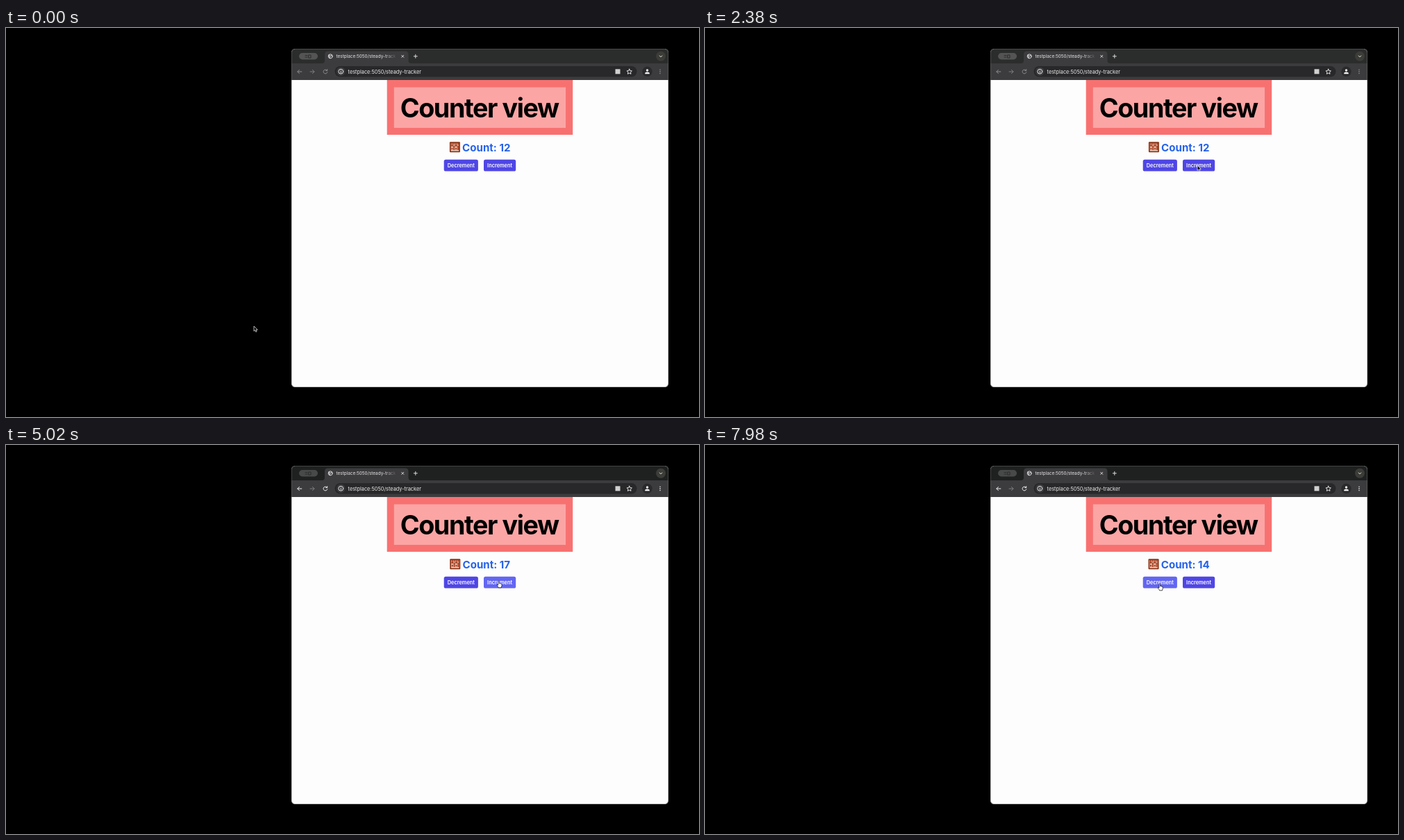
Recreate the animation shown at these times as an HTML page. Size 998 by 561 pixels, loop 8 s.

```html
<!DOCTYPE html>
<html lang="en">
<head>
<meta charset="utf-8">
<title>Counter view</title>
<style>
  html, body { margin: 0; width: 100%; height: 100%; overflow: hidden; background: #000; }
  svg { display: block; width: 998px; height: 561px; }
  text { font-family: Inter, "Open Sans", sans-serif; font-optical-sizing: none; }
  .line { fill: none; stroke-width: 1; stroke-linecap: round; stroke-linejoin: round; }
  .bold { font-weight: 700; }
  .mid { text-anchor: middle; }
  .strip { fill: #2b2c2c; }
  .pill { fill: #535453; }
  .control { stroke: #8c8c8e; }
  .dots { fill: #8c8c8e; }
  .active .strip { fill: #1f2121; }
  .active .pill { fill: #484949; }
  .active .control { stroke: #eee; }
  .active .dots { fill: #eee; }
  .button { fill: #4f46e5; }
  .button.hover { fill: #6366f1; }
</style>
</head>
<body>
<svg viewBox="0 0 998 561">
  <defs>
    <clipPath id="frame"><rect x="411" y="30" width="543" height="488" rx="5.5"/></clipPath>
    <linearGradient id="fade" gradientUnits="userSpaceOnUse" x1="545" x2="563" y1="0" y2="0">
      <stop stop-color="#e4e4e4"/>
      <stop offset="1" stop-color="#e4e4e4" stop-opacity="0"/>
    </linearGradient>
  </defs>

  <g id="browser" clip-path="url(#frame)">
    <rect x="411" y="30" width="543" height="488" fill="#fdfdfd"/>
    <rect class="strip" x="411" y="30" width="543" height="22"/>
    <path d="M455 51q4 0 4-4V38q0-4.500 4.500-4.500H575q4.500 0 4.500 4.500v9q0 4 4 4H954V75H411V51z" fill="#3c3c3e"/>
    <rect class="pill" x="422" y="36" width="27" height="9.500" rx="4.700"/>
    <path d="M431 39.500h3M431 42h3M436 39h3v4h-3z" class="line" stroke="#2c2d2d"/>

    <g class="line" stroke="#dcdcdc">
      <circle cx="467.200" cy="40.800" r="3"/>
      <path d="M465 39l2 1.500 2-1M466.500 43.500v-2l-2-1"/>
      <path d="M569.800 39.300l3 3m0-3l-3 3M587.300 40.800h5m-2.500-2.500v5"/>
    </g>
    <text x="475.500" y="43" font-size="6.400" fill="url(#fade)">testplace:5050/steady-track</text>
    <circle cx="943" cy="40.700" r="7" fill="#3c3d38"/>
    <path class="line" stroke="#eee" d="M941.200 40l1.800 1.800 1.800-1.800"/>

    <g class="line control">
      <path d="M425.800 63h-6m2.600-2.600L419.800 63l2.600 2.600"/>
      <path d="M462.300 61.200a2.900 2.900 0 1 0 .5 2.500M462.700 59.700v1.900h-1.900"/>
    </g>
    <path class="line" stroke="#7e7e80" d="M438 63h6m-2.600-2.600L444 63l-2.600 2.600"/>
    <rect x="473.500" y="55" width="435" height="15.500" rx="7.700" fill="#28282a"/>
    <circle cx="482.300" cy="62.700" r="6.200" fill="#3b3b3d"/>
    <g class="line" stroke="#e5e5e5">
      <circle cx="482.300" cy="62.700" r="3.400"/>
      <path d="M482.300 62.500v2M482.300 60.800v.1"/>
      <path d="M897.700 59.200l1.100 2.400 2.600.3-1.900 1.800.5 2.600-2.300-1.300-2.300 1.300.5-2.600-1.900-1.800 2.600-.3z"/>
    </g>
    <text x="492.600" y="65.500" font-size="7.350" fill="#ececec">testplace:5050/steady-tracker</text>
    <rect x="877.500" y="59.300" width="7" height="7" fill="#d0d0d0"/>
    <circle cx="923.500" cy="62.800" r="7.200" fill="#2a2a2c"/>
    <g fill="#f0f0f0">
      <circle cx="923.500" cy="61" r="1.700"/>
      <path d="M920.200 66.200v-.8q0-2 3.300-2t3.300 2v.8z"/>
    </g>
    <g class="dots">
      <circle cx="942" cy="60.300" r=".8"/><circle cx="942" cy="62.900" r=".8"/><circle cx="942" cy="65.500" r=".8"/>
    </g>

    <rect x="548.700" y="75" width="267.500" height="79" fill="#f87171"/>
    <rect x="558.800" y="85.500" width="247.200" height="58.500" fill="#fca5a5"/>
    <text class="bold mid" x="681.700" y="129.300" font-size="37.700" letter-spacing="-1.400">Counter view</text>

    <g id="abacus">
      <rect width="15" height="15" rx="1" fill="#8b3518"/>
      <rect x="1.800" y="1.800" width="11.400" height="11.400" fill="#ecd0bd"/>
      <g stroke="#ad3d20" stroke-width="2">
        <path d="M3.500 1.800v11.400M9.200 1.800v11.400" stroke-dasharray="5 1.500 3 1.900"/>
        <path d="M6.300 1.800v11.400M12 1.800v11.400" stroke-dasharray="2.500 1.500 6 1.400"/>
      </g>
      <path d="M1.800 5.600h11.400" stroke="#8b3518" stroke-width=".7"/>
    </g>
    <text id="count" class="bold mid" x="691.800" y="177.800" font-size="15.100" fill="#2563eb"></text>

    <rect id="decrement" class="button" x="630.700" y="189.800" width="49.200" height="16.700" rx="2.600"/>
    <rect id="increment" class="button" x="688" y="189.800" width="46.200" height="16.700" rx="2.600"/>
    <g class="mid" font-size="7.350" font-weight="600" fill="#fff">
      <text x="655.300" y="200.700">Decrement</text>
      <text x="711.100" y="200.700">Increment</text>
    </g>
  </g>
  <rect x="411.400" y="30.400" width="542.200" height="487.200" rx="5.300" fill="none" stroke="#777" stroke-opacity=".55" stroke-width=".8"/>

  <g id="cursor" stroke-linejoin="round">
    <path id="arrow" d="M0 0v7.200l1.700-1.500 1.100 2.600 1.300-.6-1.100-2.500h2.300z" fill="#000" stroke="#fff" stroke-width=".7"/>
    <path id="hand" d="M-.8.700q0-.8.800-.8t.8.800v2.400q1.200-.5 1.500.3 1-.3 1.200.5 1-.1 1 .9v1.500q0 1.300-.8 2.300v.7H-.3q-.3-1.300-1.600-2.600-1.100-1.300-.3-1.700.6-.2 1.400.7z" fill="#fff" stroke="#000" stroke-width=".7"/>
  </g>
</svg>
<script>
const LOOP = 8000;
const ACTIVATE = 2540;
const START_COUNT = 12;
const clicks = [[2760, 1], [3480, 1], [4060, 1], [4440, 1], [4820, 1], [6580, -1], [7060, -1], [7560, -1]];
// Cursor stops: time, x, y
const stops = [
  [0, 357, 430], [200, 357, 430], [1440, 705, 201], [1740, 705, 201],
  [2060, 712, 220], [2400, 709, 198], [2700, 709.5, 193.5], [3040, 709.5, 193.5],
  [3400, 710, 197], [4400, 710, 197], [4800, 709.5, 196.5], [5300, 709.5, 196.5],
  [5960, 664.5, 199], [6200, 664.5, 199], [6560, 655, 200.5], [LOOP, 654.8, 200.5]
];

const el = id => document.getElementById(id);
const smooth = u => u * u * (3 - 2 * u);

function cursorAt(time) {
  const next = stops.findIndex(stop => stop[0] > time);
  const [t0, x0, y0] = stops[next - 1];
  const [t1, x1, y1] = stops[next];
  const u = smooth((time - t0) / (t1 - t0));
  return [x0 + (x1 - x0) * u, y0 + (y1 - y0) * u];
}

function isOver(button, x, y) {
  const { x: left, y: top, width, height } = button.getBBox();
  return x >= left && x <= left + width && y >= top && y <= top + height;
}

function draw(time) {
  const active = time >= ACTIVATE;
  el("browser").classList.toggle("active", active);

  const count = clicks.reduce((sum, [at, step]) => sum + (time >= at ? step : 0), START_COUNT);
  const label = el("count");
  label.textContent = `Count: ${count}`;
  const abacusX = 691.8 - label.getComputedTextLength() / 2 - 18.2;
  el("abacus").setAttribute("transform", `translate(${abacusX} 164.300)`);

  const [x, y] = cursorAt(time);
  let hovering = false;
  for (const id of ["decrement", "increment"]) {
    const over = active && isOver(el(id), x, y);
    el(id).classList.toggle("hover", over);
    hovering ||= over;
  }
  el("cursor").setAttribute("transform", `translate(${x} ${y})`);
  el("arrow").style.display = hovering ? "none" : "";
  el("hand").style.display = hovering ? "" : "none";
}

function tick() {
  draw(performance.now() % LOOP);
  requestAnimationFrame(tick);
}
tick();
</script>
</body>
</html>
```
